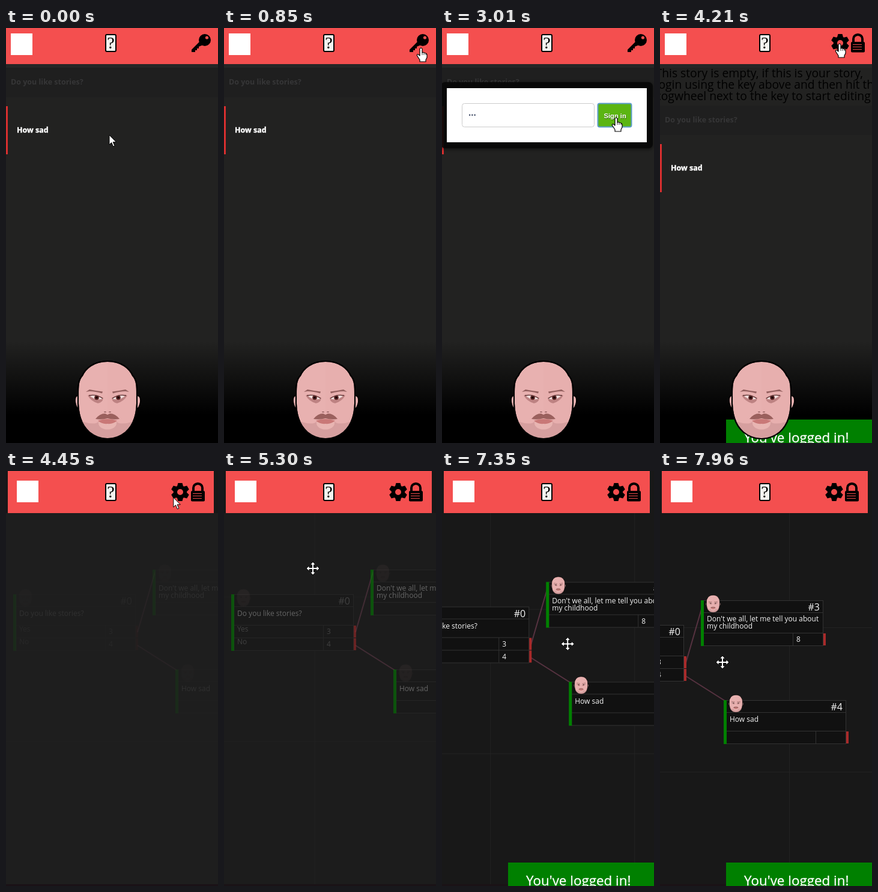
Write an HTML page that moves like this. It is 353 px wide and 690 px high and loops after 8000 ms.

```html
<!DOCTYPE html>
<html lang="en">
<head>
<meta charset="utf-8">
<title>Story editor</title>
<style>
html, body { margin: 0; width: 100%; height: 100%; overflow: hidden; background: #181818; }
svg { display: block; width: 353px; height: 690px; font-family: "Open Sans", sans-serif; }
text { white-space: pre; }
</style>
</head>
<body>
<svg viewBox="0 0 353 690" width="353" height="690">
<defs>
  <linearGradient id="fade" x1="0" y1="0" x2="0" y2="1">
    <stop offset="0" stop-opacity="0"/><stop offset=".72" stop-opacity="1"/><stop offset="1"/>
  </linearGradient>
  <linearGradient id="green" x1="0" y1="0" x2="0" y2="1">
    <stop offset="0" stop-color="#80c944"/><stop offset="1" stop-color="#58b411"/>
  </linearGradient>
  <filter id="blur" x="-10%" y="-20%" width="120%" height="140%"><feGaussianBlur stdDeviation="2.5"/></filter>
  <path id="skull" d="M169 554C193 554 206 567 211 578C219 586 218 600 218 615C219 640 213 660 199 672C189 680 180 683 169 683C158 683 149 680 139 672C125 660 119 640 120 615C120 600 119 586 127 578C132 567 145 554 169 554Z"/>
  <clipPath id="skullClip"><use href="#skull"/></clipPath>
  <g id="half">
    <path d="M133 605L139 601Q150 603 161 604.500L160 607.500Q149 604 139 604Z" fill="#94605f"/>
    <path d="M136 611Q149 608 162 615Q161 623 153 624Q142 621 136 611Z" fill="#bd8282"/>
    <path d="M140 612Q151 608.500 161 616.500Q149 620 140 612Z" fill="#f0dedc"/>
    <circle cx="151" cy="614.500" r="3.800" fill="#5a2424"/>
    <circle cx="151" cy="614.500" r="1.800" fill="#160606"/>
    <path d="M138 611Q151 608.500 161 616" fill="none" stroke="#5c3434" stroke-width="1.400"/>
  </g>
  <g id="head" transform="translate(-114 -553)">
    <g fill="#e8b1b0" stroke="#000" stroke-width="2">
      <path d="M121 611Q114 610 115 622Q117 633 122 635Z"/>
      <path d="M217 611Q225 610 224 622Q222 633 216 635Z"/>
      <use href="#skull"/>
    </g>
    <g clip-path="url(#skullClip)">
      <path d="M169 550h60v140h-60z" fill="#e3a9a8" opacity=".3"/>
      <path d="M110 646Q135 660 150 657Q169 646 188 657Q205 660 228 646V690H110Z" fill="#d69f9f"/>
      <ellipse cx="169" cy="657" rx="15" ry="10.5" fill="#e8b5b2"/>
    </g>
    <use href="#skull" fill="none" stroke="#000" stroke-width="2.2"/>
    <use href="#half"/>
    <use href="#half" transform="translate(338 0) scale(-1 1)"/>
    <path d="M163 639a2 1.3 0 0 1 4 0zM171 639a2 1.3 0 0 1 4 0z" fill="#7c4a4a"/>
    <path d="M153 653Q169 647 185 653Q178 659 169 658Q160 659 153 653Z" fill="#c97877"/>
    <path d="M149 650Q156 641 165 641L169 643L173 641Q182 641 189 650Q179 652 169 649Q159 652 149 650Z" fill="#9a605d"/>
  </g>
  <g id="book">
    <rect x="166" y="11" width="17" height="28" rx="2" fill="#f4f4f0" stroke="#000" stroke-width="2"/>
    <text x="174.5" y="34" font-family="Liberation Serif, serif" font-size="28" text-anchor="middle">?</text>
  </g>
  <g id="tools">
    <g id="teeth" transform="translate(300 25)"></g>
    <circle cx="300" cy="25" r="8" fill="none" stroke="#000" stroke-width="6"/>
    <path d="M322 25V18a7.5 7 0 0 1 15 0V25" fill="none" stroke="#000" stroke-width="4"/>
    <rect x="318" y="23" width="23" height="17.500" rx="2"/>
    <path d="M321 27.500H336M321 31.500H336M321 35.500H336" stroke="#e94a4a" stroke-width="1.200"/>
  </g>
</defs>

<g id="story">
  <rect width="353" height="690" fill="#222221"/>
  <g id="intro" font-size="19.3" fill="#000">
    <text x="-7.5" y="82">This story is empty, if this is your story,</text>
    <text x="-7.5" y="101">login using the key above and then hit the</text>
    <text x="-7.5" y="120">cogwheel next to the key to start editing</text>
  </g>
  <g id="talk" font-size="12.5" font-weight="700">
    <rect y="66" width="353" height="49" fill="#1f1f1f" opacity=".7"/>
    <text x="8" y="94" fill="#363637">Do you like stories?</text>
    <rect y="130" width="3" height="80" fill="#d62f2f"/>
    <text x="18" y="174" fill="#fff" stroke="#fff" stroke-width=".4">How sad</text>
  </g>
  <rect y="60" width="353" height="6" fill="#262626"/>
  <rect y="520" width="353" height="170" fill="url(#fade)"/>
  <rect width="353" height="60" fill="#f44f4f"/>
  <rect x="8" y="9" width="36" height="36" fill="#fff"/>
  <use href="#book"/>
  <g id="key">
    <circle cx="331" cy="20" r="10"/>
    <path d="M325 20L309 36V40H315V37H318V34H321V31L331 27Z"/>
    <circle cx="334.500" cy="16" r="2.600" fill="#f44f4f"/>
  </g>
  <use id="storyTools" href="#tools"/>
</g>

<g id="editor">
  <rect width="353" height="690" fill="#181818"/>
  <g id="board"></g>
  <rect id="veil" width="353" height="690" fill="#202020"/>
  <g id="bars"></g>
  <rect y="687" width="353" height="3" fill="#1a1216"/>
  <rect width="353" height="70" fill="#181818"/>
  <rect x="3" width="343" height="70" fill="#f44f4f"/>
  <rect x="18" y="16" width="36" height="36" fill="#fff"/>
  <use href="#book" y="10"/>
  <use href="#tools" x="-10" y="10"/>
</g>

<g id="toast">
  <rect x="110" y="651" width="243" height="39" fill="#008000"/>
  <text x="140" y="688.500" font-size="22.4" fill="#fff" stroke="#fff" stroke-width=".3">You've logged in!</text>
</g>
<use id="bigHead" href="#head" x="114" y="553"/>

<g id="popup">
  <rect x="-2" y="91" width="353" height="111" rx="7" filter="url(#blur)" opacity=".5"/>
  <rect x="-2" y="90" width="353" height="110" rx="7" fill="#070707" opacity=".86"/>
  <rect x="8" y="100" width="333" height="90" fill="#fff"/>
  <rect id="field" x="33.500" y="125.500" width="220" height="39" rx="4" fill="#fff" stroke="#ccc"/>
  <text id="entry" x="44" y="149" font-size="11.3"></text>
  <rect id="button" x="259.500" y="125.500" width="56" height="39" rx="3"/>
  <g font-family="Liberation Sans, Arial, sans-serif" font-size="11.2" font-weight="700">
    <text x="270" y="151" fill="#000" opacity=".5">Sign in</text>
    <text x="269.500" y="150" fill="#fff">Sign in</text>
  </g>
</g>

<g id="cursor" stroke-linejoin="round">
  <path id="arrow" d="M0 0V16L3.700 12.500L6.500 19L9 18L6.300 11.700H11.500Z" fill="#fff" stroke="#000"/>
  <path id="beam" d="M-3 -8H-1L0 -7L1 -8H3M0 -7V7M-3 8H-1L0 7L1 8H3" fill="none" stroke="#222"/>
  <g id="hand">
    <path d="M-2 1.500Q0 -1 2 1.500V8L4 7.500L6 8.500L8 9L10 11V16L8 20V23H-2V20L-6.500 13Q-7 10 -4.500 11L-2 13Z" fill="#fff" stroke="#000" stroke-width="1.200"/>
    <path d="M2 8V12M5 9V12M8 10V12" stroke="#000" stroke-width=".8"/>
  </g>
  <path id="move" d="M0 -11L4.500 -6H1.500V-1.500H6V-4.500L11 0L6 4.500V1.500H1.500V6H4.500L0 11L-4.500 6H-1.500V1.500H-6V4.500L-11 0L-6 -4.500V-1.500H-1.500V-6H-4.500Z" fill="#fff" stroke="#000"/>
</g>
</svg>

<script>
const LOOP = 8000;
const $ = id => document.getElementById(id);
const ramp = (t, a, b) => Math.min(1, Math.max(0, (t - a) / (b - a)));
const ease = p => p * p * (3 - 2 * p);
const mix = (a, b, p) => a + (b - a) * p;
const show = (id, alpha) => {
  const el = $(id);
  el.style.display = alpha > 0 ? "" : "none";
  el.setAttribute("opacity", alpha);
};
const shift = (id, x, y) => $(id).setAttribute("transform", `translate(${x} ${y})`);
const rect = (x, y, w, h, fill) => `<rect x="${x}" y="${y}" width="${w}" height="${h}" fill="${fill}"/>`;
const text = (x, y, s, extra = "") => `<text x="${x}" y="${y}" ${extra}>${s}</text>`;

const nodes = [
  { id: 0, x: 12, y: 205, body: 30, lines: ["Do you like stories?"], rows: [["Yes", 3], ["No", 4]] },
  { id: 3, x: 244, y: 164, body: 33, lines: ["Don't we all, let me tell you about", "my childhood"], rows: [["", 8]] },
  { id: 4, x: 282, y: 330, body: 30, lines: ["How sad"], rows: [["", ""]] }
];

function card({ id, x, y, body, lines, rows }) {
  const top = y + 21 + body, h = 21 + body + rows.length * 21;
  let s = `<rect x="${x + 4.5}" y="${y + .5}" width="199" height="${h}" fill="#111" stroke="#333"/>`;
  s += `<path d="M${x + 5} ${y + 20.5}h199M${x + 153.5} ${top + .5}V${y + h}" stroke="#333"/>`;
  s += text(x + 198, y + 17, "#" + id, 'class="label" font-size="16" text-anchor="end"');
  lines.forEach((line, i) => s += text(x + 10, y + 36 - (lines.length - 1) + i * 12, line));
  rows.forEach(([label, num], i) => {
    const ry = top + i * 21;
    s += `<path d="M${x + 5} ${ry + .5}h199" stroke="#333"/>`;
    s += text(x + 10, ry + 11, label, 'class="label"') + text(x + 159, ry + 15, num, 'class="label"');
  });
  return s;
}

function edges({ x, y, body, rows }) {
  const top = y + 21 + body;
  const ports = rows.map((r, i) => rect(x + 204, top + 1 + i * 21, 4, 20, "#a92a2a")).join("");
  return rect(x, y, 5, 21 + body + rows.length * 21 + 1, "#008000") + `<g class="port">${ports}</g>`;
}

const face = n => `<use href="#head" transform="translate(${n.x + 8} ${n.y - 9}) scale(.225)"/>`;

let grid = "";
for (let i = 0; i < 4; i++) {
  grid += `M${-88.5 + i * 240} -400V1100M-400 ${-30.5 + i * 240}H900`;
}
$("board").innerHTML =
  `<path d="${grid}" stroke="#222"/>` +
  '<path id="links" d="M219 268L249 165M219 290L284 331" stroke="#8a4862" stroke-width="2"/>' +
  `<g font-size="12" fill="#f4f4f4">${nodes.map(card).join("")}</g>` +
  `<g id="faces">${nodes.map(face).join("")}</g>`;
$("bars").innerHTML = nodes.map(edges).join("");
const ports = document.querySelectorAll(".port");
const labels = document.querySelectorAll(".label");

for (let a = 0; a < 360; a += 60) {
  $("teeth").innerHTML += `<path d="M-5.500 -8L-3.500 -15H3.500L5.500 -8Z" transform="rotate(${a})"/>`;
}

// time, x, y of the pointer
const path = [
  [60, 172, 178], [850, 328, 33], [1150, 328, 33], [1320, 302, 52], [1420, 302, 52],
  [1930, 205, 145], [2380, 205, 145], [2760, 290, 149], [3360, 290, 149], [3970, 299, 26],
  [4340, 299, 26], [4820, 148, 162], [5320, 148, 162], [6020, 149, 263], [6420, 149, 263],
  [6870, 280, 267], [6940, 280, 267]
];

function pointer(t) {
  let i = path.findIndex(p => p[0] > t);
  if (i < 0) i = path.length;
  const a = path[Math.max(0, i - 1)], b = path[Math.min(i, path.length - 1)];
  const p = a === b ? 0 : ease(ramp(t, a[0], b[0]));
  return [mix(a[1], b[1], p), mix(a[2], b[2], p)];
}

function pointerKind(t, x, y) {
  if (t >= 4340) return y > 70 ? "move" : "arrow";
  if (t < 1190) return x > 309 && y < 42 ? "hand" : "arrow";
  if (t < 3360) {
    if (y < 125 || y > 165) return "arrow";
    return x > 259 ? "hand" : x < 254 ? "beam" : "arrow";
  }
  return t > 3480 && y < 41 ? "hand" : "arrow";
}

function draw(t) {
  const logged = t >= 3480, editing = t >= 4340;
  show("story", editing ? 0 : 1);
  show("bigHead", editing ? 0 : 1);
  show("editor", editing ? 1 : 0);

  show("intro", logged ? 1 : 0);
  show("key", logged ? 0 : 1);
  show("storyTools", logged ? 1 : 0);
  shift("talk", 0, logged ? 63 : 0);
  show("toast", editing ? ramp(t, 6600, 6850) : ramp(t, 3480, 3720));

  const open = ease(ramp(t, 1140, 1310));
  show("popup", open * (1 - ramp(t, 3300, 3460)));
  shift("popup", 0, mix(-90, 0, open));
  const dots = Math.floor(mix(0, 3.99, ramp(t, 2000, 2400)));
  $("entry").textContent = dots ? "•".repeat(dots) : "Password";
  $("entry").setAttribute("fill", dots ? "#45506a" : "#98a8a0");
  const pressed = t >= 2950;
  $("field").setAttribute("stroke", t > 1980 && !pressed ? "#999" : "#ccc");
  $("button").setAttribute("fill", pressed ? "#5bb512" : "url(#green)");
  $("button").setAttribute("stroke", pressed ? "#5c9cc8" : "#468c14");
  $("button").setAttribute("stroke-width", pressed ? 2 : 1);

  const drag = ramp(t, 6940, 7960), dx = -176 * drag, dy = 51 * drag;
  const clear = ramp(t, 5300, 6250);
  shift("board", dx, dy);
  shift("bars", dx, dy);
  show("veil", mix(1, .68, ramp(t, 4340, 4820)) * (1 - clear));
  show("bars", mix(.55 * ramp(t, 4340, 4820), 1, clear));
  ports.forEach(p => p.setAttribute("opacity", t < 5060 ? .4 : 1));
  labels.forEach(l => l.setAttribute("opacity", mix(.5, 1, clear)));
  show("faces", mix(.15, 1, ramp(t, 5300, 6350)));
  show("links", mix(1, .55, ramp(t, 6940, 7200)));

  const [x, y] = pointer(t);
  const kind = pointerKind(t, x, y);
  for (const k of ["arrow", "beam", "hand", "move"]) show(k, k === kind ? 1 : 0);
  shift("cursor", x + dx, y + dy);
}

let start;
function tick(now) {
  start ??= now;
  draw((now - start) % LOOP);
  requestAnimationFrame(tick);
}
draw(0);
requestAnimationFrame(tick);
</script>
</body>
</html>
```
